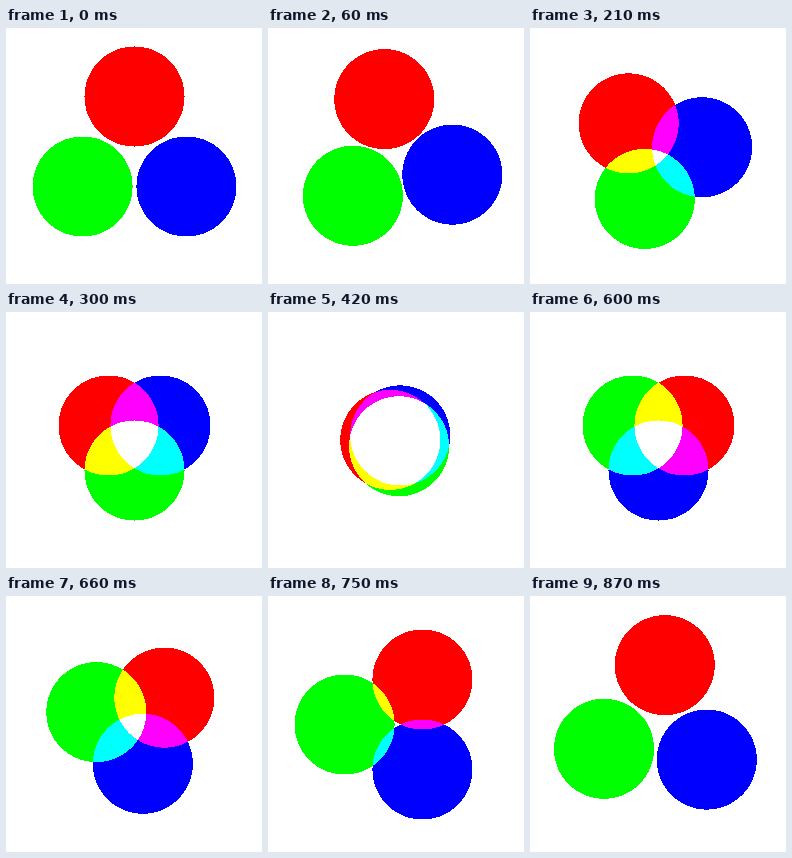
An HTML page with a canvas for the animation above (0.9 s loop, 256x256 px).

```html
<!DOCTYPE html>
<html lang="en">
<head>
<meta charset="utf-8">
<title>Additive circles</title>
<style>
  html, body { margin: 0; width: 100%; height: 100%; overflow: hidden; background: #fff; }
  canvas { display: block; width: 256px; height: 256px; image-rendering: pixelated; }
</style>
</head>
<body>
<canvas id="stage" width="256" height="256"></canvas>
<script>
const SIZE = 256, MID = 128, RADIUS = 50, REACH = 60;
const LOOP = 900, STEP = 30;
const HOME = [-90, 150, 30]; // start angles of red, green, blue
const rad = deg => deg * Math.PI / 180;

const ctx = document.getElementById('stage').getContext('2d');
const image = ctx.createImageData(SIZE, SIZE);
const px = image.data;

// Each centre swings out and back as it turns, tracing a small circle through the middle.
function centres(turn) {
  const dist = REACH * Math.cos(rad(turn));
  return HOME.map(home => {
    const a = rad(home - turn);
    return [MID + dist * Math.cos(a), MID + dist * Math.sin(a)];
  });
}

// Hard-edged discs add their light; uncovered pixels stay white.
function draw(step) {
  const discs = centres(step * STEP / LOOP * 180);
  for (let y = 0, i = 0; y < SIZE; y++) {
    for (let x = 0; x < SIZE; x++, i += 4) {
      let covered = false;
      for (let c = 0; c < 3; c++) {
        const dx = x - discs[c][0], dy = y - discs[c][1];
        const inside = dx * dx + dy * dy <= RADIUS * RADIUS;
        px[i + c] = inside ? 255 : 0;
        covered = covered || inside;
      }
      if (!covered) px[i] = px[i + 1] = px[i + 2] = 255;
      px[i + 3] = 255;
    }
  }
  ctx.putImageData(image, 0, 0);
}

const start = performance.now();
let shown = -1;

function tick() {
  const step = Math.floor((performance.now() - start) % LOOP / STEP);
  if (step !== shown) draw(shown = step);
  requestAnimationFrame(tick);
}
tick();
</script>
</body>
</html>
```
